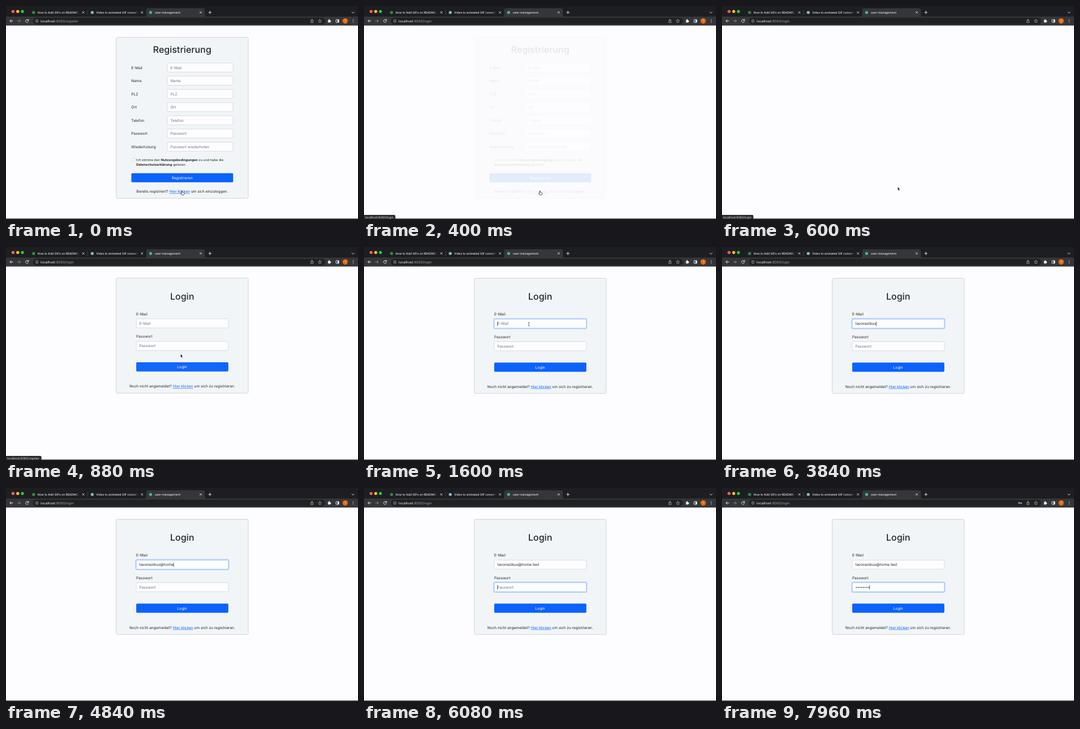
Write an HTML page that moves like this. It is 600x364 px and loops after 8 s.

```html
<!DOCTYPE html>
<html lang="de">
<head>
<meta charset="utf-8">
<title>user-management</title>
<style>
  html, body { margin: 0; width: 100%; height: 100%; overflow: hidden; background: #fdfcfe; }
  svg { display: block; width: 100vw; height: 100vh; font-family: Inter, "Liberation Sans", sans-serif; text-rendering: geometricPrecision; }
  text { white-space: pre; }
</style>
</head>
<body>
<svg id="stage" viewBox="0 0 600 364" xmlns="http://www.w3.org/2000/svg"></svg>
<script>
const LOOP = 8000;
const INK = '#212529', MUTED = '#6c757d', BLUE = '#0b62fd', BORDER = '#ccd1d7';
const stage = document.getElementById('stage');

function add(parent, tag, attrs = {}, content) {
  const node = document.createElementNS('http://www.w3.org/2000/svg', tag);
  for (const key in attrs) node.setAttribute(key, attrs[key]);
  if (content !== undefined) node.textContent = content;
  parent.appendChild(node);
  return node;
}
const group = (parent, attrs) => add(parent, 'g', attrs);
const rect = (parent, x, y, width, height, attrs) => add(parent, 'rect', { x, y, width, height, ...attrs });
const circle = (parent, cx, cy, r, attrs) => add(parent, 'circle', { cx, cy, r, ...attrs });
const label = (parent, x, y, content, size = 6.3, attrs = {}) =>
  add(parent, 'text', { x, y, 'font-size': size, fill: INK, ...attrs }, content);
const line = (parent, d, stroke, width = 0.9, attrs = {}) =>
  add(parent, 'path', { d, fill: 'none', stroke, 'stroke-width': width, 'stroke-linecap': 'round', 'stroke-linejoin': 'round', ...attrs });
const show = (node, visible) => node.setAttribute('visibility', visible ? 'visible' : 'hidden');

rect(stage, 0, 0, 600, 364, { fill: '#fdfcfe' });

// Forms
function makeCard(height, title, titleY) {
  const card = group(stage);
  rect(card, 187.9, 53.5, 225, height, { rx: 2, fill: '#f2f5f8', stroke: '#c8ccd1', 'stroke-width': 0.8 });
  label(card, 300.3, titleY, title, 15.5, { 'font-weight': 500, 'text-anchor': 'middle' });
  return card;
}
function makeInput(card, x, y, width, placeholder) {
  const box = rect(card, x, y, width, 15.6, { rx: 1.6, fill: '#fdfcfe', stroke: BORDER, 'stroke-width': 0.7 });
  const hint = label(card, x + 5.3, y + 10.1, placeholder, 6.3, { fill: MUTED });
  return { box, hint };
}
function makeButton(card, x, y, width, content) {
  rect(card, x, y, width, 15.6, { rx: 1.6, fill: BLUE });
  label(card, 300.3, y + 10.1, content, 6.3, { fill: '#fff', 'text-anchor': 'middle' });
}
function richLine(card, x, y, parts, size, attrs) {
  const text = label(card, x, y, '', size, attrs);
  for (const [content, style] of parts) add(text, 'tspan', style, content);
}
const LINK = { fill: BLUE, 'text-decoration': 'underline' };
const BOLD = { 'font-weight': 700 };

const register = makeCard(275, 'Registrierung', 80);
['E-Mail', 'Name', 'PLZ', 'Ort', 'Telefon', 'Passwort', 'Wiederholung'].forEach((name, i) => {
  const y = 97.4 + i * 22.55;
  label(register, 213.6, y + 10.1, name);
  makeInput(register, 275, y, 112, i === 6 ? 'Passwort wiederholen' : name);
});
rect(register, 214, 260, 5.2, 5.2, { rx: 1, fill: '#fff', stroke: '#bfc3c8', 'stroke-width': 0.6 });
richLine(register, 222, 264.7, [['Ich stimme den '], ['Nutzungsbedingungen', BOLD], [' zu und habe die']], 5.6);
richLine(register, 222, 273.1, [['Datenschutzerklärung', BOLD], [' gelesen.']], 5.6);
makeButton(register, 213.7, 285.7, 173.5, 'Registrieren');
richLine(register, 300.4, 318.9, [['Bereits registriert? '], ['Hier klicken', LINK], [' um sich einzuloggen.']], 6.3, { 'text-anchor': 'middle' });

const login = makeCard(196.7, 'Login', 90);
function makeField(y, name) {
  label(login, 222, y - 5.8, name);
  const ring = rect(login, 221.4, y - 0.6, 158.2, 16.8, { rx: 2.2, fill: 'none', stroke: '#b9d3fc', 'stroke-width': 2 });
  const field = makeInput(login, 222, y, 157, name);
  const value = label(login, 227.3, y + 10.1, '');
  const caret = rect(login, 0, y + 4.4, 0.6, 7.4, { fill: '#111' });
  return { ...field, ring, value, caret };
}
const email = makeField(123.2, 'E-Mail');
const password = makeField(161.7, 'Passwort');
const dots = Array.from({ length: 8 }, (_, i) => circle(login, 229 + i * 3, 169.8, 0.85, { fill: INK }));
makeButton(login, 222, 197.6, 157, 'Login');
richLine(login, 300.4, 240.7, [['Noch nicht angemeldet? '], ['Hier klicken', LINK], [' um sich zu registrieren.']], 6.3, { 'text-anchor': 'middle' });

// Browser window
const TAB_BAR = '#1d1e21', TOOLBAR = '#35363a', ICON = '#e4e6e9';
rect(stage, 0, 0, 600, 18.5, { fill: TAB_BAR });
rect(stage, 0, 18, 600, 15.4, { fill: TOOLBAR });
add(stage, 'path', { d: 'M236 18.5Q239 18 239 15V7Q239 4 242 4H336Q339 4 339 7V15Q339 18 342 18.5Z', fill: TOOLBAR });
['#ff5f57', '#febc2e', '#28c840'].forEach((fill, i) => circle(stage, 12 + i * 8, 9.3, 2.6, { fill }));

const defs = add(stage, 'defs');
const fade = add(defs, 'linearGradient', { id: 'fade' });
add(fade, 'stop', { offset: 0, 'stop-color': TAB_BAR, 'stop-opacity': 0 });
add(fade, 'stop', { offset: 0.8, 'stop-color': TAB_BAR });

const tabs = [
  [47, '#2f8d46', 'How to Add GIFs on README.md'],
  [147, '#8fb4c9', 'Video to animated GIF converter'],
  [246.5, '#42b883', 'user-management']
];
tabs.forEach(([x, fill, title], i) => {
  circle(stage, x, 11, 2.6, { fill });
  label(stage, i * 100 + 53.7, 12.6, title, 4.95, { fill: '#e8eaed', 'font-weight': 500 });
  if (i < 2) {
    rect(stage, i * 100 + 117, 5, 11, 12, { fill: 'url(#fade)' });
    rect(stage, i * 100 + 128, 5, 9, 12, { fill: TAB_BAR });
  }
  const close = i * 100 + 131.8;
  line(stage, `M${close - 1.5} 9.5l3 3m0-3l-3 3`, ICON, 0.8);
});
line(stage, 'M139 7.5v7', '#55575b', 0.6);
line(stage, 'M345.2 11h4.8m-2.4-2.4v4.8', ICON, 0.9);
line(stage, 'M589.5 10.2l2 2l2-2', ICON, 0.9);

rect(stage, 46, 20, 498, 11.4, { rx: 5.7, fill: '#202124' });
line(stage, 'M11.8 25.6H6.8m2.2-2.3l-2.3 2.3l2.3 2.3', ICON);
line(stage, 'M19.5 25.6h5m-2.2-2.3l2.3 2.3l-2.3 2.3', '#85888d');
line(stage, 'M38 24.2A2.5 2.5 0 1 0 38.2 26.5M38.4 22.7v2h-2', ICON);
circle(stage, 52.7, 25.6, 2.4, { fill: 'none', stroke: '#bdc1c6', 'stroke-width': 0.6 });
line(stage, 'M52.7 25.4v1.5M52.7 24.2v.05', '#bdc1c6', 0.7);
const address = label(stage, 59, 27.6, '', 5.82, { fill: '#f1f3f4' });
add(address, 'tspan', {}, 'localhost');
const addressPath = add(address, 'tspan', { fill: '#9aa0a6' });

line(stage, 'M520.4 24.8h-.9v3.6h4.2v-3.6h-.9M521.6 26.8v-4.2m-1.2 1.1l1.2-1.2l1.2 1.2', '#c4c7cc', 0.6);
line(stage, 'M535 22.8l.9 1.9l2 .2l-1.5 1.4l.4 2l-1.8-1l-1.8 1l.4-2l-1.5-1.4l2-.2z', '#c4c7cc', 0.6);
rect(stage, 548.8, 24, 4.2, 4.2, { rx: 0.5, fill: ICON });
circle(stage, 550.8, 23.6, 1.1, { fill: ICON });
circle(stage, 553.2, 26, 1.1, { fill: ICON });
rect(stage, 562.5, 23.2, 4.8, 4.8, { rx: 0.5, fill: 'none', stroke: ICON, 'stroke-width': 0.9 });
rect(stage, 565, 23.2, 2.3, 4.8, { fill: ICON });
circle(stage, 578.2, 25.6, 4.6, { fill: '#ea6a0c' });
label(stage, 578.2, 27.4, 'T', 4.8, { fill: '#ffd9bd', 'text-anchor': 'middle' });
[23.4, 25.6, 27.8].forEach(y => circle(stage, 591.8, y, 0.65, { fill: ICON }));
const key = group(stage);
circle(key, 506.6, 25.6, 1.3, { fill: 'none', stroke: '#d5d8dc', 'stroke-width': 0.9 });
line(key, 'M508 25.6h3m-.6 0v1.3', '#d5d8dc', 0.9);

rect(stage, 0, 363.2, 600, 0.8, { fill: '#2b2b2d' });
const status = group(stage);
const statusBox = add(status, 'path', { fill: '#292a2d' });
const statusText = label(status, 1.8, 362.6, '', 5, { fill: '#dfe1e5' });

// Pointer shapes, each with its hot spot at 0,0
const arrow = add(stage, 'path', { d: 'M0 0V6.2L1.4 4.9L2.4 7.1L3.4 6.7L2.4 4.5H4.2Z', fill: '#111', stroke: '#fff', 'stroke-width': 0.5 });
const hand = add(stage, 'path', {
  d: 'M-.7 0Q0-.7 .6 0V2.4Q1.4 1.9 1.8 2.6Q2.5 2.2 2.9 2.9Q3.6 2.6 3.8 3.4V5L3 7H-.5L-2.4 4.3Q-2.3 3.4-1.4 3.9L-.7 4.5Z',
  fill: '#fff', stroke: '#111', 'stroke-width': 0.65
});
const beam = line(stage, 'M-1-3Q0-3 0-2.3V2.3Q0 3-1 3M1-3Q0-3 0-2.3M0 2.3Q0 3 1 3', '#222', 0.6);

// Timeline
const NAVIGATE = 120, FOCUS = 1480, TAB = 5880, KEY_SHOWN = 6320;
const ADDRESS = 'tavonezikus@home.test';
const letterTimes = [1880, 2120, 2240, 2360, 2560, 2680, 2800, 3200, 3440, 3560, 3720, 4120, 4400, 4520, 4680, 4840, 5040, 5240, 5400, 5480, 5600];
const dotTimes = [6240, 6360, 6520, 6680, 6840, 7000, 7280, 7520];
const pointerPath = [[0, 300, 316], [480, 300, 316], [600, 299.5, 309.5], [740, 299, 245], [880, 297.6, 183], [1120, 288, 146], [1360, 281, 132]];

const clamp = v => Math.max(0, Math.min(1, v));
const smooth = v => v * v * (3 - 2 * v);
const progress = (t, start, length) => clamp((t - start) / length);
const countBefore = (times, t) => times.filter(time => time <= t).length;

function pointerAt(t) {
  const last = pointerPath.length - 1;
  const i = Math.min(last - 1, pointerPath.filter(p => p[0] <= t).length - 1);
  const [t0, x0, y0] = pointerPath[i], [t1, x1, y1] = pointerPath[i + 1];
  const k = progress(t, t0, t1 - t0);
  return [x0 + (x1 - x0) * k, y0 + (y1 - y0) * k];
}

function drawPointer(t) {
  const [x, y] = pointerAt(t);
  const kind = t >= letterTimes[0] ? null
    : t < 480 || (y > 234 && y < 243) ? hand
    : y > 123 && y < 139 ? beam : arrow;
  for (const shape of [arrow, hand, beam]) {
    show(shape, shape === kind);
    shape.setAttribute('transform', `translate(${x} ${y})`);
  }
}

function drawStatus(t) {
  const target = t >= 80 && t < 740 ? 'login' : t >= 740 && t < 1400 ? 'register' : '';
  show(status, target);
  const right = target === 'login' ? 53.5 : 60.5;
  statusBox.setAttribute('d', `M0 357H${right - 2}Q${right} 357 ${right} 359V364H0Z`);
  statusText.textContent = 'localhost:8080/' + target;
}

function drawFocus(field, amount) {
  field.ring.setAttribute('opacity', amount);
  field.box.setAttribute('stroke', amount > 0.5 ? '#86b7fe' : BORDER);
}

function drawCaret(field, x, focused, t, lastInput) {
  field.caret.setAttribute('x', x);
  show(field.caret, focused && (t - lastInput) % 1000 < 500);
}

function drawLogin(t) {
  const letters = countBefore(letterTimes, t), typedDots = countBefore(dotTimes, t);
  email.value.textContent = ADDRESS.slice(0, letters);
  show(email.hint, !letters);
  show(password.hint, !typedDots);
  dots.forEach((dot, i) => show(dot, i < typedDots));
  drawFocus(email, progress(t, FOCUS, 150) - progress(t, TAB, 150));
  drawFocus(password, progress(t, TAB, 150));
  const textEnd = letters ? email.value.getComputedTextLength() : 0;
  drawCaret(email, 227.2 + textEnd, t >= FOCUS && t < TAB, t, letters ? letterTimes[letters - 1] : FOCUS);
  drawCaret(password, 227.3 + typedDots * 3, t >= TAB, t, typedDots ? dotTimes[typedDots - 1] : TAB);
}

function draw(t) {
  const registerOpacity = 1 - smooth(progress(t, 160, 300));
  const loginOpacity = smooth(progress(t, 610, 300));
  register.setAttribute('opacity', registerOpacity);
  login.setAttribute('opacity', loginOpacity);
  login.setAttribute('transform', `translate(0 ${loginOpacity < 1 ? -0.5 : 0})`);
  login.setAttribute('display', loginOpacity ? 'inline' : 'none');
  addressPath.textContent = ':8080/' + (t < NAVIGATE ? 'register' : 'login');
  show(key, t >= KEY_SHOWN);
  if (loginOpacity) drawLogin(t);
  drawStatus(t);
  drawPointer(t);
}

const start = performance.now();
function tick() {
  draw((performance.now() - start) % LOOP);
  requestAnimationFrame(tick);
}
tick();
</script>
</body>
</html>
```
